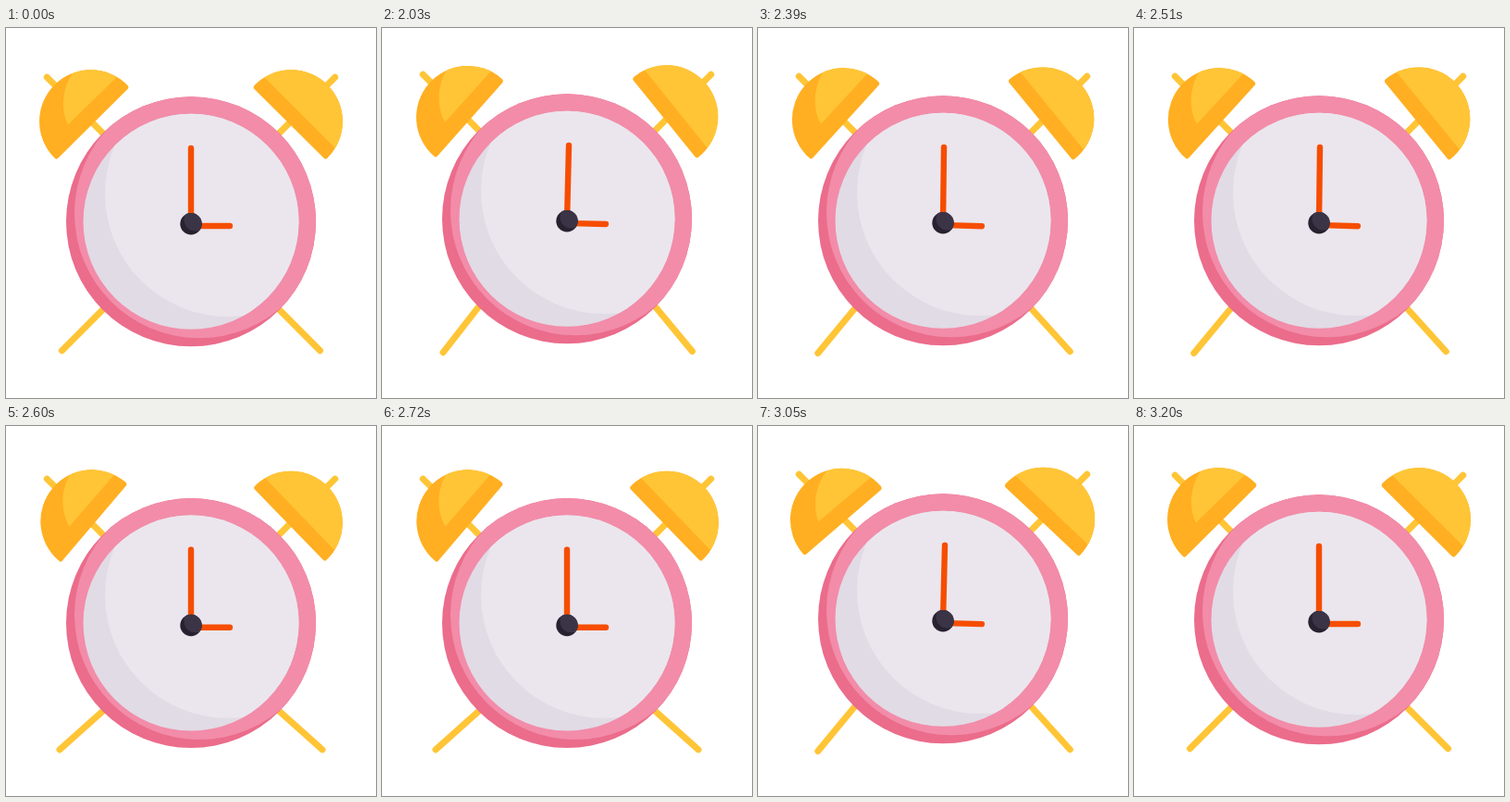
Animation of 400x400 px, one loop 3.23 s. Source, as an HTML page:

```html
<!DOCTYPE html>
<html lang="en">
<head>
<meta charset="utf-8">
<title>Alarm clock</title>
<style>
  html, body { margin: 0; width: 100%; height: 100%; overflow: hidden; background: #fff; }
  svg { display: block; width: 100%; height: 100%; }
  .bar { stroke: #ffc536; stroke-width: 7; stroke-linecap: round; }
  .hand { stroke: #f64d00; stroke-width: 6.4; stroke-linecap: round; }
</style>
</head>
<body>
<svg viewBox="0 0 400 400">
  <defs>
    <path id="dome" d="M131 61.5A55 55 0 0 0 52.5 140.5Q54.5 143 57 140L131.5 66Q133.5 63.8 131 61.5Z"/>
    <clipPath id="domeClip"><use href="#dome"/></clipPath>
    <clipPath id="rimClip"><circle cx="200" cy="209.3" r="135"/></clipPath>
    <clipPath id="faceClip"><circle cx="200" cy="209.3" r="116.5"/></clipPath>
    <clipPath id="hubClip"><circle cx="200" cy="211.7" r="11.7"/></clipPath>
  </defs>
  <g id="clock">
    <path class="bar" id="legL" d="M114 295L60.5 348.7"/>
    <path class="bar" id="legR" d="M286 295L339.5 348.7"/>
    <path class="bar" d="M44.3 53.3L110 119M355.7 53.3L290 119"/>
    <g id="bellL">
      <use href="#dome" fill="#ffaf21"/>
      <path clip-path="url(#domeClip)" fill="#ffc536" d="M76 44C61 60 58 88 67 104.5L130 43V30H76Z"/>
    </g>
    <g id="bellR">
      <g transform="matrix(-1 0 0 1 400 0)">
        <use href="#dome" fill="#ffaf21"/>
        <path clip-path="url(#domeClip)" fill="#ffc536" d="M155 19L20 154V19Z"/>
      </g>
    </g>
    <circle cx="200" cy="209.3" r="135" fill="#eb6c8b"/>
    <circle cx="209" cy="200.3" r="135" fill="#f28ca9" clip-path="url(#rimClip)"/>
    <circle cx="200" cy="209.3" r="116.5" fill="#e1dbe5"/>
    <circle cx="240" cy="179" r="133" fill="#ebe6ed" clip-path="url(#faceClip)"/>
    <path class="hand" id="minute" d="M200 130V205"/>
    <path class="hand" id="hour" d="M205 214H242"/>
    <circle cx="200" cy="211.7" r="11.7" fill="#272130"/>
    <circle cx="204.5" cy="207.5" r="12" fill="#3b3446" clip-path="url(#hubClip)"/>
  </g>
</svg>
<script>
const LOOP = 3230, START = 2000, STEP = 30, LAST = 40, SETTLE = 36;

// Rotating parts: id, pivot, direction
const parts = [
  ["legL", 104, 305, -1],
  ["legR", 296, 305, 1],
  ["bellL", 71, 85, -1],
  ["bellR", 327, 94, 1],
  ["minute", 200, 211.7, 1],
  ["hour", 200, 211.7, 1]
].map(([id, x, y, dir]) => ({ el: document.getElementById(id), x, y, dir }));
const clock = document.getElementById("clock");

// Vertical shift, then one angle per part
const rest = [0, 0, 0, 0, 0, 0, 0];
const lift = [-3, 7, 5.2, 3.7, 6.2, 1.4, 1.4];
const shake = [
  [3.8, -3.3, -3.4, 4.8, 1.1, 0, 0],
  [-1, 5.4, 2.8, 2.9, 5.8, 0.7, 1.7],
  [-6, 14, 10, -4.5, 6, 2, 3],
  [-1, 5.4, 2.8, -4.1, -1.5, 1.4, 1.5]
];

function poseAt(step) {
  if (step <= 0 || step >= LAST) return rest;
  if (step === 1) return lift;
  if (step < SETTLE) return shake[step % 4];
  const left = (LAST - step) / (LAST - SETTLE);
  return [shake[0][0] * left, ...rest.slice(1)];
}

function draw(ms) {
  const step = Math.floor((ms % LOOP - START) / STEP + 0.001);
  const [shift, ...angles] = poseAt(step);
  clock.setAttribute("transform", `translate(0 ${shift})`);
  parts.forEach((p, i) =>
    p.el.setAttribute("transform", `rotate(${angles[i] * p.dir} ${p.x} ${p.y})`));
}

const origin = performance.now();
function tick() {
  draw(performance.now() - origin);
  requestAnimationFrame(tick);
}
tick();
</script>
</body>
</html>
```
